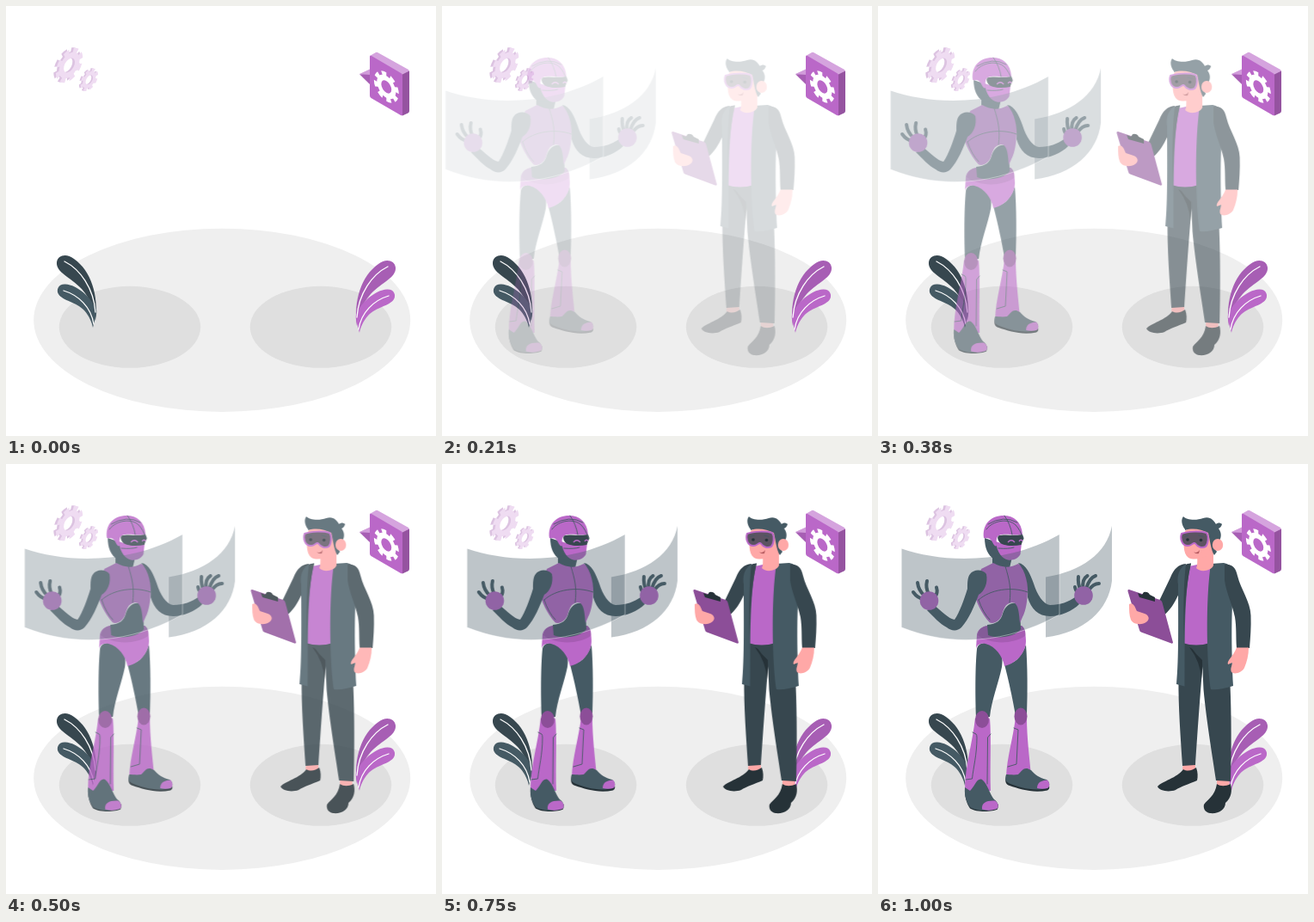
These frames come from a looping animation (500x500 px, 1040 ms). An HTML page without scripts:

```html
<!DOCTYPE html>
<html lang="en">
<head>
<meta charset="utf-8">
<title>Robot and engineer</title>
<style>
  html, body { margin: 0; width: 100%; height: 100%; overflow: hidden; background: #fff; }
  svg { display: block; width: 100vw; height: 100vh; }
  .p { fill: #ba68c8; }
  .pd { fill: #8c4e98; }
  .d { fill: #37474f; }
  .m { fill: #455a64; }
  .k { fill: #263238; }
  .skin { fill: #ffa8a7; }
  .line { fill: none; stroke: #455a64; stroke-width: .9; stroke-linecap: round; stroke-linejoin: round; }
  .finger { fill: none; stroke: #455a64; stroke-width: 4; stroke-linecap: round; }
  .vein { fill: none; stroke: #fff; stroke-width: 1.3; stroke-linecap: round; }
  .glass { fill: #455a64; fill-opacity: .35; }
  .enter { animation: slide 1.04s infinite, blank 1.04s infinite; }
  @keyframes slide {
    0% { transform: translateX(-29.9px); opacity: 0; animation-timing-function: cubic-bezier(.347, .077, .499, 1.369); }
    92.8%, 100% { transform: none; opacity: 1; }
  }
  @keyframes blank {
    0%, 7.6% { visibility: hidden; }
    7.65%, 100% { visibility: visible; }
  }
</style>
</head>
<body>
<svg viewBox="0 0 500 500">
  <defs>
    <g id="gear" fill="none" stroke="currentColor" transform="rotate(20)">
      <circle r="9.8" stroke-width="5.8"/>
      <circle r="14.2" stroke-width="5" pathLength="16" stroke-dasharray="1.1 .9"/>
    </g>
    <g id="cog">
      <use href="#gear" x="-2.8" y="-1.8" color="#dcc3e1"/>
      <use href="#gear" color="#efdcf2"/>
    </g>
    <path id="leafA" d="M104 366C108 337 99 308 79 294C70 287 60 290 59 298C58 310 75 315 88 329C98 340 102 352 104 366Z"/>
    <path id="leafB" d="M101 374C104 362 106 358 105 353C100 340 83 324 69 323.5C61 323 58 330 61 335C66 343 82 344 91 354C97 361 100 368 101 374Z"/>
    <path id="veins" class="vein" d="M68 297C86 306 102 328 104 356M67 331C84 336 99 350 102 370"/>
  </defs>

  <!-- floor -->
  <ellipse cx="251.2" cy="365.3" rx="219" ry="106.6" fill="#efefef"/>
  <g fill="#dfdfdf">
    <ellipse cx="144" cy="373.3" rx="82.2" ry="47.5"/>
    <ellipse cx="366" cy="373.3" rx="82.2" ry="47.5"/>
  </g>

  <!-- plants -->
  <use href="#leafA" class="d"/>
  <use href="#leafB" class="m"/>
  <use href="#veins"/>
  <g transform="translate(512 6) scale(-1 1)">
    <use href="#leafA" fill="#a75eb4"/>
    <use href="#leafB" class="p"/>
    <use href="#veins"/>
  </g>

  <!-- gears -->
  <use href="#cog" transform="matrix(.94 -.54 0 1.09 73.6 69)"/>
  <use href="#cog" transform="matrix(.61 -.35 0 .71 96.8 85.8)"/>

  <!-- speech box -->
  <path d="M411 79L424 73V82Z" fill="#d19bda"/>
  <path d="M411 79.3L424 80V92Z" fill="#a75eb4"/>
  <path d="M423 58L430 54Q431.500 53.500 433 54.500L468 74L469 76L461 81Z" fill="#d5a4de"/>
  <path d="M460 80L469 75.500V122Q469 123.500 467.500 124.500L461 127.500Z" fill="#9553a0"/>
  <path class="p" d="M423 59Q423 57 425 58L460 78.500Q461 79.500 461 81V126.500Q461 128 459 127L424.500 107Q423 106 423 104Z"/>
  <use href="#gear" color="#fff" transform="matrix(.866 .5 0 1 442.300 94)"/>

  <!-- robot -->
  <g class="enter">
    <path class="p" d="M160 294C166 302 171 302 173 294C173 318 176 340 178 362L149 364C150 340 157 320 160 294Z"/>
    <path class="line" d="M158 307L163 309L161 349L151 352"/>
    <path class="k" d="M149 364C147 369 149 373 153 374C165 378 180 383 197 379.500Q200 378 199 374Z"/>
    <path class="m" d="M149 361C147 367 149 370 153 371.500C165 376 180 381 197 377C201 374 199 369 196 367C188 365 182 361 178 356C170 351 168 356 163 361C158 362 152 361 149 361Z"/>
    <path class="p" d="M185 377C185 370 190 368 197 367.500C200 371 200 375 197 377Q191 378.500 185 377Z"/>
    <path class="p" d="M113 295C120 305 126 305 130 295C132 320 130 350 131 380L101 380C101 350 110 325 113 295Z"/>
    <path class="line" d="M110 312L114 314Q115 315 115 318C115 338 111 352 109.500 366L102 367M131 314L127.500 318L127 372"/>
    <path class="k" d="M101 380C101 389 104 396 107 400.500C115 405.500 133 404.500 139 401.500L140 396Z"/>
    <path class="m" d="M101 376C100 388 104 394 107 399C115 404 132 404 139 400.500C141 396 138 392 135 390C130 384 127 371 121 367C115 364 112 376 107 380Z"/>
    <path class="p" d="M121 401.500C120 394 126 391 136 391.500C140 394 141 399 138 401Q129 404 121 401.500Z"/>

    <path class="m" d="M115 215C116 208 125 206 134 210C143 214 146 224 144 236C140 255 132 275 130 294L114 294C113 270 113 235 115 215Z"/>
    <path class="m" d="M147 233C158 233 167 225 172 210C174 235 174 265 173 291L160 293C157 275 152 252 147 233Z"/>
    <ellipse class="pd" cx="121" cy="297" rx="8" ry="10"/>
    <ellipse class="pd" cx="166" cy="293.500" rx="7.500" ry="10"/>

    <path class="p" d="M115 198C117 190 125 188 128 188C140 196 155 196 167 188C171 192 172 200 172 206C172 220 160 232 147 235C145 224 137 212 125 209C119 208 115 210 114 215Z"/>
    <path d="M116 199C117 190 125 188 129 188H167C171 191 172 196 171 200C156 210 130 210 116 199Z" fill="#a65cb3"/>
    <path class="m" d="M127 187C138 186 143 182 145 174C148 163 159 157 165 166L166 192C160 201 138 204 128 199Z"/>
    <path class="m" d="M133 100V119Q143 127 153 121L156 108Z"/>
    <path class="p" d="M120 122L134 115C144 121 154 121 163 116C171 120 174 130 174 142C174 160 172 170 168 178L165 185C164 172 163 161 156 161C147 162 146 170 144 176C141 183 135 186 130 184.500C120 174 114 160 112 150Z"/>
    <path class="line" d="M117 158C130 146 155 142 174 149M148 119C153 135 155 145 153 161M117 158Q122 173 130 181"/>

    <path class="m" d="M107 128C111 122 122 122 126 128C128 138 124 148 117 152C112 165 106 180 97 190C92 195 85 194 80 190C72 186 64 177 57 170L65 164C74 171 82 180 89 181C95 172 100 158 104 145C104 138 104 132 107 128Z"/>
    <path class="m" d="M163 115C172 116 177 128 181 139C185 152 192 163 200 164C212 164 222 160 229 155L234 163C226 171 212 177 200 177C186 177 178 168 174 155C175 140 172 125 163 115Z"/>
    <path class="finger" d="M41 149Q46 156 53 157M46 138Q47 147 54 153M57 136Q55 144 59 151M68 143.500Q70 150 66 155"/>
    <path class="finger" d="M229 143Q230 149 234 151M233 131Q232 140 236 147M243.500 130Q237 134 238.500 145M253 130Q246 132 242 145M257 139Q250 139 245 147"/>
    <circle class="p" cx="59.500" cy="159" r="10.800"/>
    <circle class="p" cx="239" cy="153" r="10.800"/>

    <path class="m" d="M124 86C124 98 128 106 134 110L148 112L150 95Z"/>
    <path class="p" d="M123 86C121 70 131 60 146 60C158 60 167 67 168 82C160 84 148 80 141 83C138 84 137 88 138 95C135 97 134 91 131 88C128 85 125 87 123 86Z"/>
    <path class="p" d="M137 90C145 94 158 95 167 92L165.500 105C163 110 157 112.500 151 111.500C145 110.500 138 103 137 90Z"/>
    <path class="d" d="M140 83.500C146 81 160 84 168 82L169.500 86L166.500 94C158 96 147 95 143 92.500C140 90 138 86 140 83.500Z"/>
    <path d="M151 91q4-4.500 8 0M164 90q2.500-3.500 4 0" fill="none" stroke="#ba68c8" stroke-width="1.300"/>
    <path class="line" d="M126 76C134 65 152 63 160 71Q165 76 169 87M128 70Q146 59 162 68M147 60Q154 70 156 82M140 98Q152 99 158 97"/>

    <path class="glass" d="M27.500 98.500C75 115 150 117 211 82V175C150 209 85 213 27.500 190Z"/>
    <path class="glass" d="M195 131.500C236 125 266 104 272 72V136C268 170 240 196 195 201.500Z"/>
    <path d="M211 82V175C150 209 85 213 27.500 190" fill="none" stroke="#fff" stroke-opacity=".45" stroke-width=".9"/>
  </g>

  <!-- engineer -->
  <g class="enter">
    <path class="skin" d="M355 346H369V355Q361 360 354 355ZM394 364H408.500V373Q401 378 394 373Z"/>
    <path class="k" d="M355 355C360 358 366 356 370 353C372 358 372 364 371 368C362 372 352 375 346 379C338 382 327 380 325 375C330 369 348 365 355 355Z"/>
    <path class="k" d="M394 372C398 375 404 375 410 372C412 380 411 388 404 394C404 402 396 407 386 406C380 405 378 400 379 396C383 390 392 386 394 372Z"/>
    <path class="d" d="M354 206H384L377 240C374 275 371 320 369 350L354 351C352 320 349 280 349.500 250Z"/>
    <path class="k" d="M362 213L378 222L376 250Q375 230 362 213Z"/>
    <path class="d" d="M364 213L386 207L409.500 257C411 290 411 335 410 369L393 368C389 340 382 300 378.500 262L377 228Q370 222 364 213Z"/>

    <path class="p" d="M362 119L371 117C375 124 384 124 389 117L386 208Q370 213 354 208L357 126Z"/>
    <path class="d" d="M358 116C349 117 344 122 340 132L328 157C325 163 318 167 314 171L320 184C332 178 342 170 351 148Z"/>
    <path class="m" d="M364 115.500C353 116 347 126 349 140C349 180 350 225 347 256L356.500 258.500C357 220 355 150 364 115.500Z"/>
    <path class="d" d="M364 115.500L358 117C354 150 356 190 355.500 215C356 180 357 145 364 115.500Z"/>
    <path class="m" d="M387 116L402 115C412 117 415 124 415 132C410 160 411 220 413 258C403 261 394 263 387 262C383 240 380 165 387 116Z"/>
    <path class="d" d="M403 117C412 116 416 121 418 130C422 146 433 160 433.500 176C434 190 433 202 432 214H417C416 200 417 190 415 178C411 160 405 150 403 135Z"/>
    <path class="skin" d="M417 213.500H431C431 222 429 230 426 237C423 243 414 245 411 242C409 238 412 234 412 231L407 233C405 229 413 224 417 213.500Z"/>

    <path class="pd" d="M292 146L328 158Q330 159 330.500 161L343 207.500Q343 209 341 208.500L306 195.500Q304.500 195 304 193L290.500 148Q290 145.500 292 146Z"/>
    <path class="k" d="M302 150L307 152L309 149Q314 148 316 152L322 155V160L304 155Z"/>
    <path class="skin" d="M292 163C297 160 299 167 301 171L310 174C315 176 316 180 313 183C307 188 297 187 294 181C292 176 292 170 292 163Z"/>

    <path class="skin" d="M371 106L390 98V118C387 125 374 126 370 121Q372 117 371 106Z"/>
    <path class="skin" d="M357 78C355 90 354 104 361 109C367 112 376 110 383 107L392 98V76L362 74Z"/>
    <path class="m" d="M357 76C353 71 352 65 355 61C358 65 370 66 378 63C386 60 391 66 393 70C395 68 398 68 400 70C399 73 398 74 396 75C400 80 399 86 397 89L391 97L394 102L391 106C387 100 386 88 384 80C376 76 366 74 357 77Z"/>
    <ellipse class="skin" cx="395" cy="94" rx="6.200" ry="7"/>
    <path d="M353 81C361 78 375 78 382 80C385 84 384 93 381 96C377 98 372 97 369 92.500C367 90 364 96 360 95C353 95 351 86 353 81Z" fill="#5c5362" stroke="#ba68c8" stroke-width="2"/>
    <g class="k">
      <circle cx="360" cy="88" r="1.800"/>
      <circle cx="375.500" cy="88.500" r="1.800"/>
    </g>
    <path class="line" d="M357 84l4-1M373 83l5 1.500"/>
    <path d="M367 102q4 2.500 7-2l-1 4q-4 1-6-2Z" fill="#b55a60"/>
  </g>
</svg>
</body>
</html>
```
